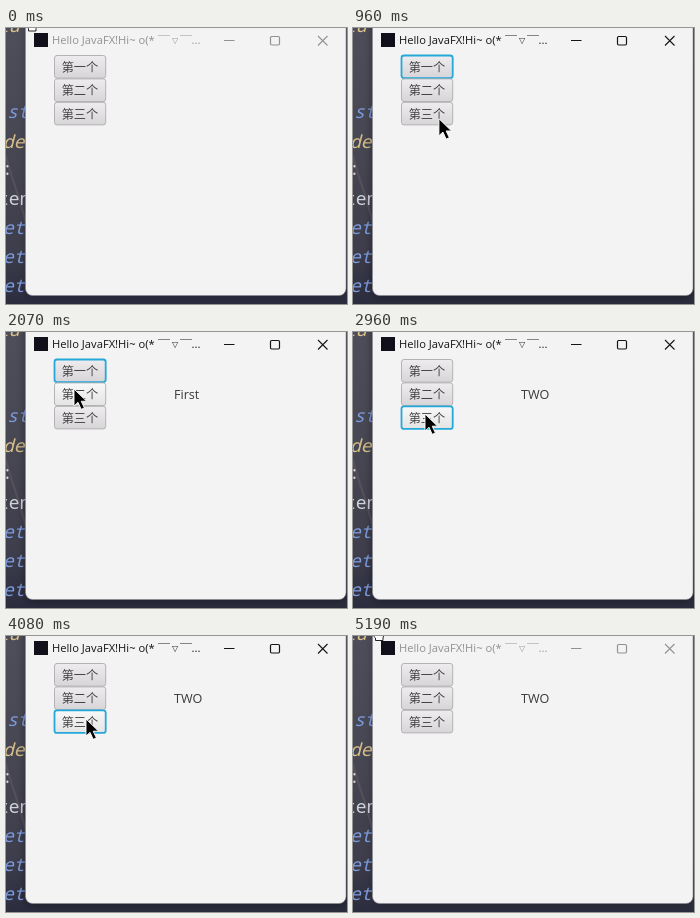
An HTML page that plays this animation: 341x276 px, repeating every 5220 ms.

```html
<!DOCTYPE html>
<html lang="zh">
<head>
<meta charset="utf-8">
<title>JavaFX buttons</title>
<style>
  html, body { margin: 0; width: 100%; height: 100%; overflow: hidden; background: #2c2d3c; }
  svg { display: block; width: 100vw; height: 100vh; }
  .code { font: 18px "Noto Sans Mono", "DejaVu Sans Mono", monospace; }
  .italic { font-style: italic; }
  .title { font: 11.2px "Open Sans", "Noto Sans", sans-serif; fill: currentColor; }
  .wide { font: 12px "Noto Sans CJK SC", "Noto Sans CJK", sans-serif; fill: currentColor; }
  .small { font: 8px "DejaVu Sans", sans-serif; fill: currentColor; }
  .caption { font: 12.2px "Noto Sans CJK SC", "Noto Sans CJK", sans-serif; fill: #444; }
  .label { font: 12.6px "Open Sans", "Noto Sans", sans-serif; fill: #3a3a3e; }
  .controls { fill: none; stroke: currentColor; }
</style>
</head>
<body>
<svg viewBox="0 0 341 276" preserveAspectRatio="none">
  <defs>
    <linearGradient id="backdrop" x2="0" y2="1">
      <stop offset="0" stop-color="#4d4e5a"/>
      <stop offset=".45" stop-color="#474753"/>
      <stop offset=".8" stop-color="#3e3e4c"/>
      <stop offset="1" stop-color="#2b2c3d"/>
    </linearGradient>
    <linearGradient id="plain" x2="0" y2="1">
      <stop offset="0" stop-color="#eeecee"/>
      <stop offset="1" stop-color="#d8d5d8"/>
    </linearGradient>
    <linearGradient id="hover" x2="0" y2="1">
      <stop offset="0" stop-color="#f8f8f8"/>
      <stop offset="1" stop-color="#e5e4e5"/>
    </linearGradient>
    <filter id="blur" x="-10%" y="-10%" width="120%" height="120%">
      <feGaussianBlur stdDeviation="5"/>
    </filter>
  </defs>

  <rect width="341" height="276" fill="url(#backdrop)"/>
  <path d="M0 128C5 150 14 168 20 196" fill="none" stroke="#6a5d66" stroke-opacity=".5" stroke-width="2"/>
  <g id="code"></g>
  <rect id="shadow" x="19" y="-20" width="322" height="289" rx="8" filter="url(#blur)"/>

  <rect x="19.5" y="-10" width="320.5" height="277.5" rx="7" fill="#f3f3f3" stroke="#8a8a92" stroke-width=".6"/>
  <rect x="28" y="5" width="14" height="14" fill="#11101a"/>
  <g id="titleBar">
    <text class="title" x="46" y="16.3">Hello JavaFX!Hi~ o(*</text>
    <text class="wide" x="152" y="18">￣</text>
    <text class="small" x="166" y="15">▽</text>
    <text class="wide" x="174" y="18">￣</text>
    <text class="title" x="185.5" y="16.3">...</text>
    <g class="controls">
      <path d="M218 12.5h10.5"/>
      <rect x="264.5" y="8.5" width="9" height="8.5" rx="1.2" stroke-width="1.2"/>
      <path d="M312 8l9.5 9.5M321.5 8l-9.5 9.5" stroke-width="1.1"/>
    </g>
  </g>
  <g id="buttons"></g>
  <text id="label" class="label" x="168" y="66.5"></text>

  <path id="arrow" d="M0 0V17L4 13.3L7.2 20.3L10.4 18.9L7.2 12.2H12.6Z"
        fill="#000" stroke="#fff" stroke-width=".9"/>
  <path id="hand" d="M0 -5V-1Q1 1 2.5 2V4.5H10V2Q11 0 11 -5Z"
        fill="#fff" stroke="#222" stroke-width="1"/>
</svg>

<script>
const LOOP = 5220;
const ACTIVE = [150, 5100];
const HOVER_LAG = 30;
const $ = id => document.getElementById(id);

function add(parent, tag, attrs, text = "") {
  const node = document.createElementNS("http://www.w3.org/2000/svg", tag);
  for (const key in attrs) node.setAttribute(key, attrs[key]);
  node.textContent = text;
  parent.append(node);
  return node;
}

const blue = "#7c9bdc", yellow = "#d9c08a", white = "#d2d4da";
const codeLines = [
  ["tu", -8, 4, yellow], ["st", 1, 90, blue], ["de", -3, 120, yellow],
  [":", -4, 147, white], ["ten", -8, 177, white],
  ["et", -3, 206, blue], ["et", -3, 235, blue], ["et", -3, 264, blue]
];
for (const [text, x, y, fill] of codeLines) {
  add($("code"), "text", { x, y, fill, class: fill === white ? "code" : "code italic" }, text);
}

const buttons = ["第一个", "第二个", "第三个"].map((caption, i) => {
  const top = 27.5 + i * 23.4;
  const box = add($("buttons"), "rect", { x: 48.5, y: top, width: 51.2, height: 22.6, rx: 2.5 });
  add($("buttons"), "text", { class: "caption", x: 55.7, y: top + 16.3 }, caption);
  return { box, top };
});

// [time, value] steps
const focusSteps = [[0, 0], [2460, 1], [2930, 2], [3440, 0], [3830, 1], [4050, 2]];
const labelSteps = [[0, ""], [1280, "First"], [2490, "TWO"], [3470, "First"], [3860, "TWO"]];
const stepAt = (steps, t) => steps.filter(s => s[0] <= t).pop()[1];

// [time, x, y] of the pointer tip
const path = [
  [0, 25, -16], [30, 25, -16], [160, 78, 90], [300, 105, 160], [660, 105, 160],
  [960, 86, 91], [1160, 72, 43], [1190, 72, 43], [1560, 70, 41], [1830, 70, 41],
  [2070, 68, 57], [2310, 70, 61], [2460, 70, 61], [2930, 72, 82], [2990, 72, 82],
  [3410, 78, 39], [3530, 78, 39], [3650, 79, 56], [3850, 79, 65], [4050, 80, 83],
  [4110, 80, 83], [4590, 88, 102], [4620, 88, 102], [4900, 60, 42], [5130, 22, -16],
  [LOOP, 22, -16]
];

function slope(i, axis) {
  const a = path[i - 1], b = path[i], c = path[i + 1];
  if (!a || !c || a[axis] === b[axis] || b[axis] === c[axis]) return 0;
  return (c[axis] - a[axis]) / (c[0] - a[0]);
}

function pointerAt(t) {
  const i = path.findIndex(p => p[0] > t) - 1;
  const a = path[i], b = path[i + 1], span = b[0] - a[0];
  const u = (t - a[0]) / span, v = 1 - u;
  return [1, 2].map(axis =>
    v * v * (1 + 2 * u) * a[axis] + u * u * (3 - 2 * u) * b[axis] +
    span * u * v * (v * slope(i, axis) - u * slope(i + 1, axis)));
}

function draw(t) {
  const active = t >= ACTIVE[0] && t < ACTIVE[1];
  const [x, y] = pointerAt(t);
  const [hoverX, hoverY] = pointerAt(Math.max(0, t - HOVER_LAG));
  const focused = active ? stepAt(focusSteps, t) : -1;

  $("titleBar").style.color = active ? "#151515" : "#929292";
  $("shadow").setAttribute("fill-opacity", active ? 0.4 : 0.22);
  $("label").textContent = stepAt(labelSteps, t);

  buttons.forEach(({ box, top }, i) => {
    const over = hoverX > 48 && hoverX < 100 && hoverY >= top && hoverY < top + 23.4;
    box.setAttribute("fill", over ? "url(#hover)" : "url(#plain)");
    box.setAttribute("stroke", i === focused ? "#25a8da" : "#b4b2b4");
    box.setAttribute("stroke-width", i === focused ? 1.8 : 1);
  });

  const outside = t < 30 || t >= 5130;
  $("arrow").style.display = outside ? "none" : "";
  $("hand").style.display = outside ? "" : "none";
  $("arrow").setAttribute("transform", `translate(${x} ${y})`);
  $("hand").setAttribute("transform", t < 30 ? "translate(20 -1.5)" : "translate(20 0)");
}

const start = performance.now();
function tick() {
  draw((performance.now() - start) % LOOP);
  requestAnimationFrame(tick);
}
tick();
</script>
</body>
</html>
```
